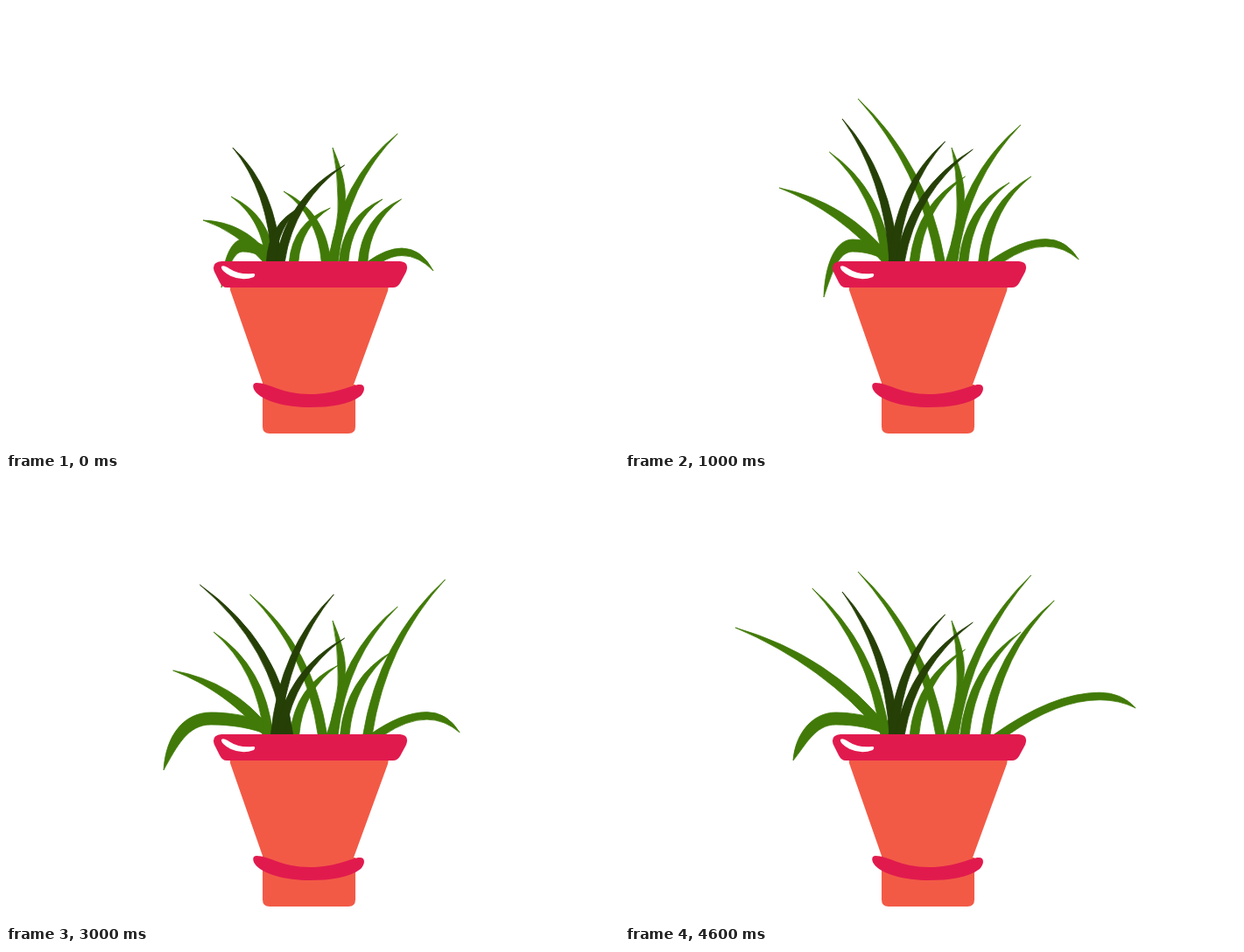
Write an HTML page that moves like this. It is 700x509 px and loops after 5000 ms.

```html
<!DOCTYPE html>
<html lang="en">
<head>
<meta charset="utf-8">
<title>Potted plant</title>
<style>
  html, body { margin: 0; width: 100%; height: 100%; overflow: hidden; background: #fff; }
  svg { display: block; width: 100%; height: 100%; }
  #light { fill: #417a08; stroke: #417a08; }
  #dark { fill: #253f06; stroke: #253f06; }
</style>
</head>
<body>
<svg viewBox="0 0 700 509">
  <g stroke-width=".8" stroke-linejoin="round">
    <g id="light"></g>
    <g id="dark"></g>
  </g>
  <path fill="#f25a46" d="M256 320V325L293 431V481Q293 489 301 489H391Q399 489 399 481V433H397L436 326L437 320Z"/>
  <g fill="#e11a4e">
    <path d="M246 292H450Q461 293 457 304L450 317Q447 322 442 322H252Q247 322 244 316L238 304Q234 293 246 292Z"/>
    <path d="M286 431C300 431 315 444 347 444C378 444 395 433 404 433C411 433 410 441 405 446C392 456 370 459 347 459C320 459 292 452 284 440C281 435 282 431 286 431Z"/>
  </g>
  <path fill="#fff" d="M246 298Q248 296 253 299Q266 308 282 306Q286 306 283 310Q270 315 257 309Q245 303 246 298Z"/>
</svg>
<script>
const HOLD = 1000, POSES = 5, SOIL = 293, WIDTH = 10.5;

// Upright blade: its tip slides along a sloped line as it grows, while taller
// blades straighten and push their base outward. Sway tips the whole blade over.
function upright(center, lean, h, sway = 0) {
  const side = Math.sign(lean);
  const x = center + side * (14 + sway) + lean * h, y = 292 - h;
  const base = center + side * (0.05 * h - 0.65 * sway);
  const bend = (0.08 + (h - 65) * 0.001) * Math.abs(lean) / 0.48;
  const ctrlY = y + (0.28 + (h - 65) * 0.001) * h;
  const outer = base - side * WIDTH / 2, inner = base + side * WIDTH / 2;
  const ctrlX = from => from + bend * (x - from);
  return `M${outer} ${SOIL}Q${ctrlX(outer)} ${ctrlY} ${x} ${y}` +
    `Q${ctrlX(inner)} ${ctrlY + 5} ${inner} ${SOIL}Z`;
}

// Low blade spreading to the left.
function spread(rise) {
  const x = 225 - 1.32 * rise, y = 245 - rise;
  const cx = 300 + 0.37 * (x - 300), cy = 270 + 0.6 * (y - 284);
  return `M${x} ${y}Q${cx} ${cy} 302 286V${SOIL}H294Q${cx - 9} ${cy + 11} ${x} ${y}Z`;
}

// Blade arching over the left of the rim.
function droop(reach, tipY) {
  const at = k => 300 - k * reach;
  return `M${at(1)} ${tipY}C${at(.98)} 292 ${at(.8)} 267 ${at(.55)} 267` +
    `C${at(.3)} 267 ${at(.1)} 275 302 277V${SOIL}H300` +
    `C${at(.15)} 285 ${at(.35)} 281 ${at(.55)} 281` +
    `C${at(.77)} 281 ${at(.87)} 305 ${at(1)} ${tipY}Z`;
}

// Blade arching to the right: base, crest and tip all follow one rise.
function arch(rise) {
  const base = 412 + 0.2 * rise, x = 488 + 2.32 * rise, y = 303 - rise;
  const topX = 452 + 2.2 * rise, topY = 277 - 0.8 * rise, low = topY + 8.5;
  const cx = base + 0.56 * (topX - base), bend = topX + 0.62 * (x - topX);
  return `M${base} ${SOIL}Q${cx} ${topY} ${topX} ${topY}Q${bend} ${topY} ${x} ${y}` +
    `Q${bend - 3} ${low} ${topX} ${low}Q${cx + 6} ${low} ${base + 17} ${SOIL}Z`;
}

const still = () => 'M373 162Q392 205 386 230Q378 255 379 293H366Q381 250 379 220Q379 190 373 162Z';

// Growth through the poses: start, second pose, middle, end (fourth pose defaults to the third).
const grow = (shape, a, b, c, end, d = c) => pose => shape([a, b, c, d, end][pose]);
const stem = (center, lean, ...sizes) => grow(h => upright(center, lean, h), ...sizes);
const tilted = pose => pose === 3 ? upright(315.5, -.328, 171, 24) : stem(315.5, -.328, 130, 163, 161, 163)(pose);

const plants = {
  light: [
    pose => droop([54, 73, 120, 120, 108][pose], pose % 4 ? 333 : 322),
    grow(spread, 0, 37, 26, 75),
    grow(arch, 0, 13, 13, 41),
    stem(305.5, -.465, 74, 125, 117, 167),
    stem(369.5, -.481, 80, 186, 160, 186),
    stem(366.5, .457, 146, 156, 146, 182),
    stem(325.5, .505, 61, 97, 61, 97, 79),
    stem(382, .478, 71, 90, 71, 117, 95),
    stem(404, .472, 71, 97, 177, 153),
    still
  ],
  dark: [
    tilted,
    stem(299.5, .38, 62, 137, 160, 137),
    stem(307.5, .592, 110, 128, 110, 128)
  ]
};

const start = performance.now();
let shown = -1;

function tick() {
  const pose = Math.floor((performance.now() - start) / HOLD) % POSES;
  if (pose !== shown) {
    for (const id in plants) {
      document.getElementById(id).innerHTML = plants[id].map(blade => `<path d="${blade(pose)}"/>`).join('');
    }
    shown = pose;
  }
  requestAnimationFrame(tick);
}
tick();
</script>
</body>
</html>
```
